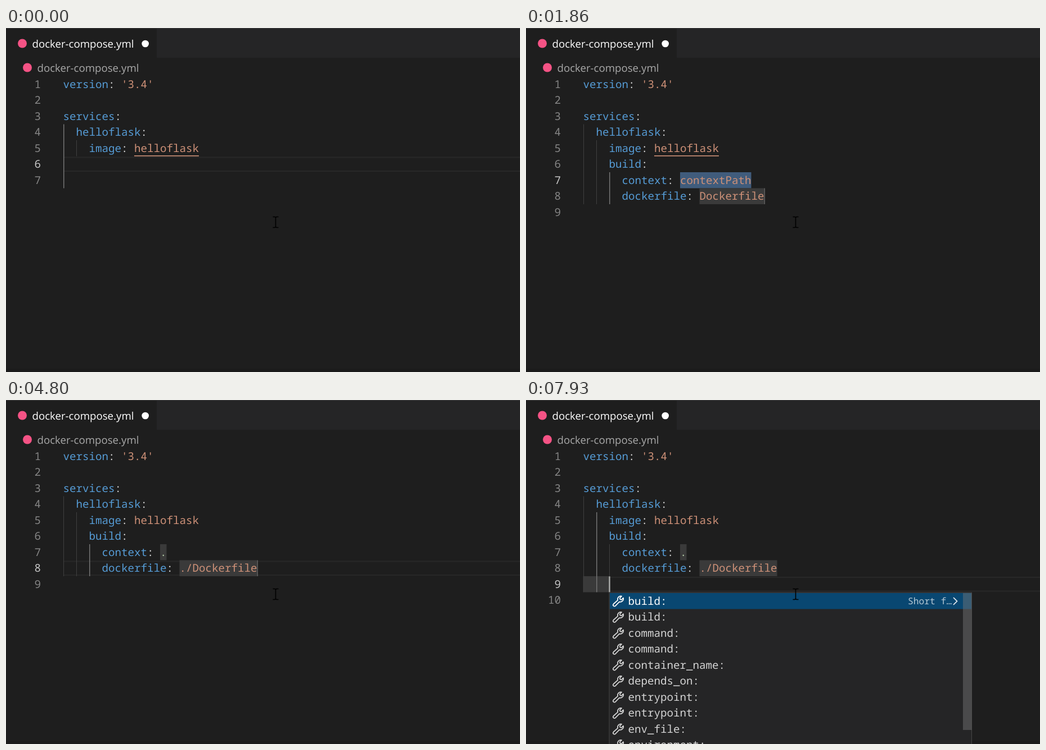
An HTML page for the animation above (8 s loop, 914 px wide and 613 px high).

```html
<!DOCTYPE html>
<html lang="en">
<head>
<meta charset="utf-8">
<title>docker-compose.yml</title>
<style>
html, body { margin: 0; width: 100%; height: 100%; overflow: hidden; background: #1e1e1e; }
svg { display: block; width: 914px; height: 613px; }
text { text-rendering: geometricPrecision; font: 19.17px "Noto Sans Mono", "DejaVu Sans Mono", monospace; }
text.ui { font: 18.65px "Open Sans", "Noto Sans", sans-serif; }
text.note { font-size: 16.3px; }
</style>
</head>
<body>
<svg viewBox="0 0 914 613">
  <rect width="914" height="613" fill="#1e1e1e"/>
  <rect y="607" width="914" height="6" fill="#1b1b1b"/>
  <rect x="268" width="646" height="53" fill="#252526"/>
  <rect width="914" height="1" fill="#3c3c3c"/>
  <circle cx="29" cy="27.5" r="8" fill="#f55385"/>
  <text class="ui" x="46.5" y="35" fill="#fff">docker-compose.yml</text>
  <circle cx="247.7" cy="28" r="6.3" fill="#fff"/>
  <circle cx="38" cy="70.5" r="8" fill="#f55385"/>
  <text class="ui" x="55.5" y="78" fill="#a9a9a9">docker-compose.yml</text>
  <g id="view"></g>
  <path d="M474.5 336.5h3.5l1.5 1 1.5-1h3.5M474.5 355.5h3.5l1.5-1 1.5 1h3.5M479.5 337v18" fill="none" stroke="#000" stroke-width="1.6"/>
</svg>
<script>
const LOOP = 8000, X0 = 101.5, CW = 11.5, LH = 28.5;
const KEY = '#569cd6', STR = '#ce9178', NUM = '#b5cea8', PLAIN = '#d4d4d4';
const ITEMS = ['build', 'build', 'command', 'command', 'container_name', 'depends_on',
  'entrypoint', 'entrypoint', 'env_file', 'environment', 'expose', 'healthcheck'];
const WRENCH = 'M9.2 8.4A5.6 5.6 0 0 1 16 1.3L12.8 4.6 13.4 7 16 7.6 19 4.4A5.6 5.6 0 0 1 12 11.3L5 18.6A2.4 2.4 0 0 1 1.6 15.2Z';

// Guides are [column, first line, last line]; act is the bright one.
const START = {
  on: 0, line: 6, col: 0, nums: 7, hl: 1, under: 1, build: 0, ctx: '', file: 'Dockerfile',
  pick: '', echo: 0, menu: 0, sel: 0, note: '', bar: 0, guides: [[0, 4, 7], [2, 5, 5]], act: 0
};
const nested = [[0, 4, 8], [2, 5, 8], [4, 7, 8]];
const STEPS = [
  [30, { on: 1 }],
  [200, { col: 2, guides: [[0, 4, 6], [2, 5, 5]] }],
  [370, { col: 4, guides: [[0, 4, 6], [2, 5, 6]], act: 1 }],
  [400, { menu: 257.5, note: 'Short form' }],
  [460, { bar: 1, note: 'Short f…' }],
  [730, { on: 0 }],
  [1060, { on: 1 }],
  [1330, { on: 0, sel: 1, note: 'Long form' }],
  [1500, { on: 1, menu: 0, bar: 0, build: 1, nums: 9, line: 7, col: 26, hl: 0,
    ctx: 'contextPath', pick: 'ctx', guides: nested, act: 2 }],
  [1860, { on: 0 }],
  [2200, { on: 1, ctx: '.', pick: '', col: 16 }],
  [2260, { under: 0 }],
  [2600, { line: 8, col: 28, pick: 'file' }],
  [2630, { echo: 1 }],
  [2960, { on: 0 }],
  [3300, { on: 1 }],
  [3630, { col: 18, pick: '', hl: 1 }],
  [3660, { echo: 0 }],
  [3960, { on: 0 }],
  [4230, { on: 1, col: 19, file: '.Dockerfile' }],
  [4500, { col: 20, file: './Dockerfile' }],
  [4800, { on: 0 }],
  [5130, { on: 1 }],
  [5200, { col: 30 }],
  [5230, { line: 9, col: 6, nums: 10, guides: [[0, 4, 9], [2, 5, 9], [4, 7, 9]] }],
  [5570, { on: 0 }],
  [5900, { on: 1 }],
  [6230, { on: 0 }],
  [6560, { on: 1 }],
  [6630, { col: 4, guides: [[0, 4, 9], [2, 5, 9], [4, 7, 8]], act: 1 }],
  [6960, { on: 0 }],
  [7300, { on: 1 }],
  [7600, { on: 0 }],
  [7830, { menu: 343, sel: 0, note: 'Short form' }],
  [7900, { bar: 1, note: 'Short f…' }],
  [7930, { on: 1 }]
];

const colX = c => X0 + c * CW;
const lineY = n => 86 + (n - 1) * LH;
const rect = (x, y, w, h, fill) => `<rect x="${x}" y="${y}" width="${w}" height="${h}" fill="${fill}"/>`;
const text = (x, y, s, fill, more = '') => `<text x="${x}" y="${y}" fill="${fill}" ${more}>${s}</text>`;
const code = (n, c, s, fill) => text(colX(c), lineY(n) + 20.8, s, fill);
const block = (n, c, len, fill) => rect(colX(c), lineY(n), len * CW, LH, fill);

function pair(n, c, key, value = '', fill = STR) {
  const k = key.length;
  return code(n, c, key, KEY) + code(n, c + k, ':', PLAIN) + (value && code(n, c + k + 2, value, fill));
}

function drawMenu(s) {
  const y = s.menu, h = ITEMS.length * LH;
  let out = `<rect x="148" y="${y}" width="644.5" height="${h + 4}" fill="#252526" stroke="#454545"/>`;
  ITEMS.forEach((name, i) => {
    const ry = y + 1 + i * LH, on = i === s.sel, hover = ry < 346 && ry + LH > 346;
    if (on || hover) out += rect(149, ry, 643, LH, on ? '#094771' : '#2a2d2e');
    const ink = on ? '#fff' : PLAIN;
    out += `<path transform="translate(154 ${ry + 4.3})" d="${WRENCH}" fill="none" stroke="${ink}" stroke-width="1.7" stroke-linejoin="round"/>`;
    out += text(181.5, ry + 20.8, name + ':', ink);
    if (!on) return;
    const cut = s.note.endsWith('…');
    out += text(cut ? 679 : 777.5 - s.note.length * 9.8, ry + 20, s.note, '#b5c8d4', 'class="note"');
    if (cut) out += `<path d="M760 ${ry + 8}l6.5 6.5-6.5 6.5" fill="none" stroke="#e4ebf0" stroke-width="1.7"/>`;
  });
  if (s.bar) out += rect(777, y + 1, 15.5, 244, 'rgba(121,121,121,.45)');
  return out;
}

function draw(s) {
  let out = '';
  if (s.hl) [1, LH - 3].forEach(d => out += rect(102, lineY(s.line) + d, 812, 2, '#282828'));

  if (s.build) {
    const soft = '#3a3a3a', strong = '#405c7c';
    out += block(7, 15, s.ctx.length, s.pick === 'ctx' ? strong : soft);
    out += block(8, 18, s.file.length, s.pick === 'file' ? strong : soft);
    if (s.echo) out += block(8, 6, 10, '#333a3f');
    if (s.line === 9) out += block(9, 0, s.col, soft);
    else out += rect(colX(18 + s.file.length), lineY(8), 1.5, LH, '#626262');
  }

  s.guides.forEach(([c, a, b], i) => {
    const on = i === s.act;
    out += rect(colX(c) + .5, lineY(a), on ? 1.5 : 1, (b - a + 1) * LH, on ? '#747474' : '#404040');
  });

  for (let n = 1; n <= s.nums; n++)
    out += text(62, lineY(n) + 20.8, n, n === s.line ? '#c6c6c6' : '#858585', 'text-anchor="end"');

  out += pair(1, 0, 'version', "'3.4'") + pair(3, 0, 'services') + pair(4, 2, 'helloflask');
  out += pair(5, 4, 'image', 'helloflask');
  if (s.under) out += rect(colX(11), 227, 10 * CW, 1.6, STR);
  if (s.build) {
    out += pair(6, 4, 'build') + pair(7, 6, 'context', s.ctx, s.ctx === '.' ? NUM : STR);
    out += pair(8, 6, 'dockerfile', s.file);
  }

  if (s.on) out += rect(colX(s.col) - .2, lineY(s.line) + .3, 2.4, LH - .3, '#aeafad');
  if (s.menu) out += drawMenu(s);
  return out;
}

const view = document.getElementById('view');
const t0 = performance.now();
let shown = -1;

function tick() {
  const t = Math.max(0, performance.now() - t0) % LOOP;
  const past = STEPS.filter(step => step[0] <= t);
  if (past.length !== shown) {
    shown = past.length;
    view.innerHTML = draw(Object.assign({}, START, ...past.map(step => step[1])));
  }
  requestAnimationFrame(tick);
}
tick();
</script>
</body>
</html>
```
